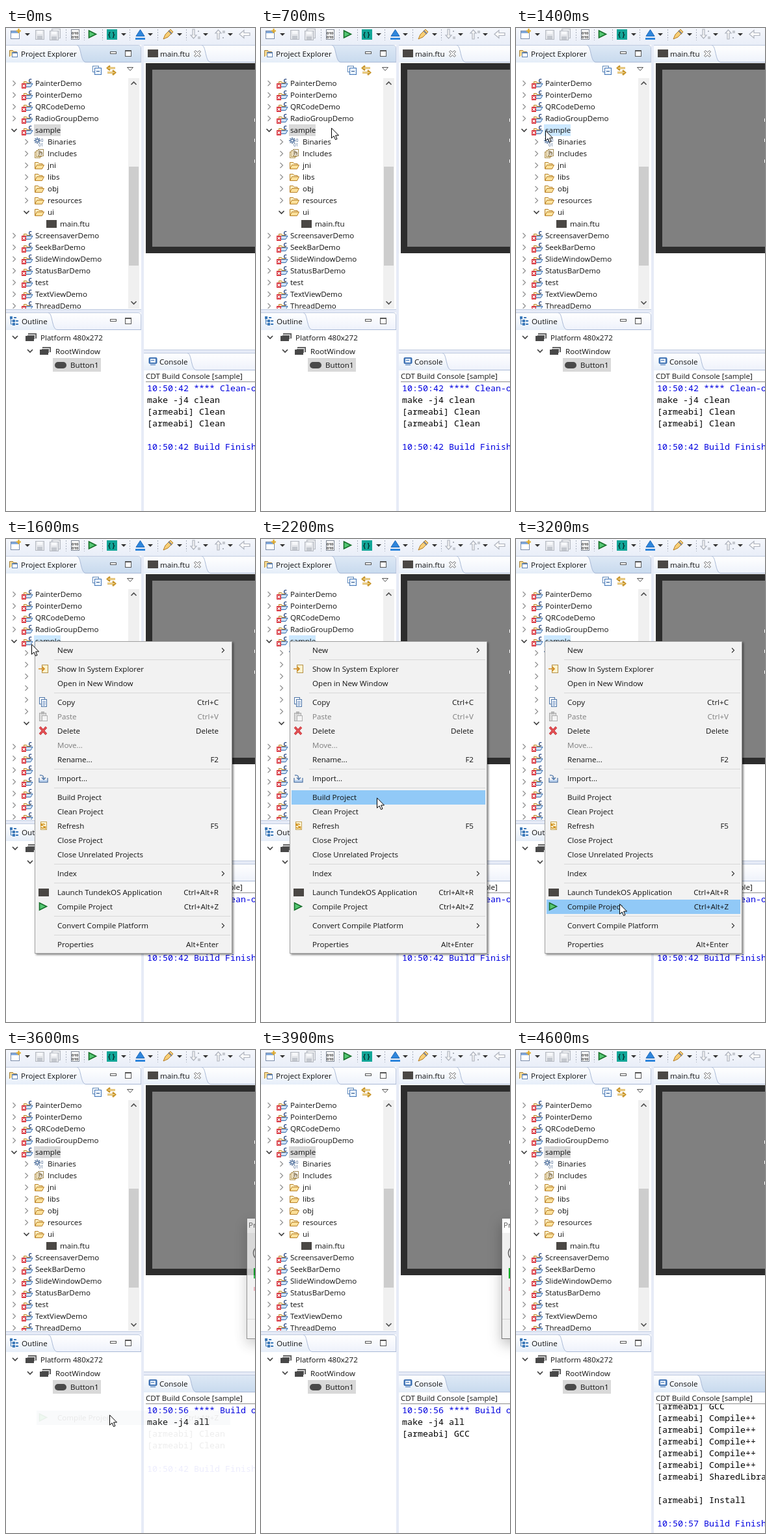
Animation of 383x742 px, one loop 5.9 s. Source, as an HTML page:

```html
<!DOCTYPE html>
<html lang="en">
<head>
<meta charset="utf-8">
<title>Building a project</title>
<style>
html, body { margin: 0; width: 100%; height: 100%; overflow: hidden; background: #fff; }
svg { display: block; width: 383px; height: 742px; }
text { font: 11.6px "Open Sans", "Noto Sans", sans-serif; white-space: pre; }
.mono { font: 13.33px "Noto Sans Mono", "DejaVu Sans Mono", monospace; }
rect { shape-rendering: crispEdges; }
.soft { shape-rendering: auto; }
</style>
</head>
<body>
<svg id="stage" viewBox="0 0 383 742"></svg>
<script>
const LOOP = 5900, STEP = 100;
const INK = '#111', BLUE = '#0000e0';

const rect = (x, y, w, h, fill, more = '') =>
  `<rect x="${x}" y="${y}" width="${w}" height="${h}" fill="${fill}" ${more}/>`;
const box = (x, y, w, h, fill, stroke, more = '') =>
  rect(x + .5, y + .5, w - 1, h - 1, fill, `stroke="${stroke}" ${more}`);
const path = (d, stroke, width = 1, fill = 'none') =>
  `<path d="${d}" stroke="${stroke}" stroke-width="${width}" fill="${fill}"/>`;
const text = (x, y, s, fill = INK, more = '') =>
  `<text x="${x}" y="${y}" fill="${fill}" ${more}>${s}</text>`;
const at = (x, y, s) => `<g transform="translate(${x} ${y})">${s}</g>`;
const group = (id, s) => `<g id="${id}">${s}</g>`;

// Small icons, each drawn from its top left corner
const icon = {
  folder: path('M1.5 13V3.5h5l1.5 2h5V8', '#b98127', 1, '#fdeec0') +
    path('M1.5 13.5l3-6h11l-3 6z', '#b98127', 1, '#fbe09a'),
  project: path('M3.5 12V5.5h4l1 2h5V9', '#b98127', 1, '#fdeec0') +
    path('M4 13.5l3-5h10l-3 5z', '#3569a8', 1, '#cfe2f8') +
    text(10.5, 6.5, 'C', '#20407c', 'style="font-size:8.5px;font-weight:700"') +
    rect(0, 8, 7, 8, '#d8323c') + path('M1.5 10l4 4m0-4l-4 4', '#fff', 1.3),
  binaries: path('M5 1v10M0 6h10M1.5 2.5l7 7m0-7l-7 7', '#4d6f9c', 1.4) +
    '<circle cx="5" cy="6" r="2" fill="#fff" stroke="#4d6f9c"/>' +
    text(7, 8, '10', '#3c5c86', 'style="font-size:6.5px"') + text(7, 15, '01', '#3c5c86', 'style="font-size:6.5px"'),
  includes: box(1, 5, 9, 10, '#fff6dc', '#b09355') + box(3, 3, 9, 10, '#fff6dc', '#b09355') +
    box(6, 1, 9, 11, '#fff', '#a38a52') + text(7.5, 10, 'h', '#6c5426', 'style="font-size:9px;font-weight:700"'),
  app: rect(0, 2, 16, 12, '#4a4744'),
  tree: [1, 6, 11].map((y, i) => rect(i ? 5 : 1, y, 4, 4, '#3b78b8') + rect(i ? 10 : 7, y + 1, 4, 2, '#3b78b8')).join('') +
    path('M2.5 5v8h3M2.5 8h3', '#3b78b8'),
  windows: box(4, 0, 13, 8, '#777', '#555') + box(2, 2, 13, 8, '#666', '#fff') + rect(0, 4, 13, 8, '#484848'),
  screen: '<rect class="soft" x=".5" y="1" width="13" height="10" rx="2" fill="#3f72b4"/>' +
    rect(3, 3, 8, 6, '#eaf3fd') + rect(4, 5, 5, 1, '#3f72b4') + rect(3, 12, 8, 1, '#3f72b4'),
  explorer: path('M1.5 13V3.5h5l1 2h5V7', '#a5813c', 1, '#f8dc92') + box(5, 6, 9, 8, '#fff', '#5d82b3') +
    rect(5, 6, 9, 2, '#5d82b3'),
  reveal: box(5, 1, 10, 13, '#fff4cf', '#b59146') + path('M0 7.5h8M5.5 4l3.5 3.5-3.5 3.5', '#d18a1f', 1.7),
  copy: box(1, 0, 9, 11, '#fff', '#4f76a8') + box(4, 3, 9, 12, '#f2f7ff', '#4f76a8') +
    path('M6 6.5h5M6 8.5h5M6 10.5h5M6 12.5h4', '#7d9cc4'),
  paste: box(1, 2, 11, 13, '#dcdcdc', '#aaa') + rect(4, 0, 5, 4, '#b4b4b4') + box(5, 6, 9, 9, '#f4f4f4', '#b0b0b0'),
  cross: path('M2 2l10 11M12 2L2 13', '#c62f36', 3.4) + path('M2 2l10 11M12 2L2 13', '#ea5a5c', 1.6),
  load: path('M1 7v6.5h13V7', '#4f76a8', 1.3) + rect(2, 10, 11, 3, '#bfd4ee') +
    path('M2 3c5-1 6 2 6 6M5 6.5l3 3 3-3', '#4f76a8', 1.3),
  refresh: box(3, 1, 10, 13, '#fff6d8', '#c6a456') +
    path('M10 6a3.5 3.5 0 0 0-6 1M4 3.5V7h3.5M4 10a3.5 3.5 0 0 0 6-1M10.5 12.5V9H7', '#d0901b', 1.5),
  play: path('M1.5 2l11 5.5-11 5.500z', '#176f2b', 1.6, '#55c773'),
  link: path('M14 4.5H3M6 1L2 4.5 6 8M2 11.5h11M10 8l4 3.5-4 3.5', '#c9962c', 2.6) +
    path('M14 4.5H3M2 11.5h11', '#fbe6a4', 1),
  collapse: box(0, 0, 10, 10, '#fff', '#5b86b8') + box(3, 3, 11, 11, '#eaf3fd', '#3f72b4') + rect(6, 8, 5, 1, '#234f8a')
};

const chevron = (x, y) => path(`M${x} ${y - 4}l4 4-4 4`, '#8f8f8f', 1.2);
const opened = (x, y) => path(`M${x} ${y - 2}l4 4 4-4`, '#404040', 1.7);
const drop = x => `<path d="M${x} 8h8l-4 4z" fill="#333"/>`;
const grip = x => `<path d="M${x + .5} 2v17" stroke="#a8afbd" stroke-dasharray="2 2"/>`;

function toolbar() {
  const disk = box(0, 0, 14, 15, '#e4e6ea', '#b5b9c1') + rect(3, 1, 8, 5, '#f6f7f9') + rect(3, 9, 8, 5, '#c3c7ce');
  const faint = d => path(d, '#aeb3bd', 1.2, '#fafafa');
  const bits = y => text(2, y, '010', '#333', 'style="font-size:6px;font-weight:700"');
  return rect(0, 0, 383, 26, 'url(#bar)') +
    at(7, 3, box(0, 1, 14, 13, '#fff', '#7a8caa') + rect(1, 2, 12, 3, '#7fa8dc') + path('M12.5-2v7M9 1.5h7', '#e0a928', 2.2)) +
    drop(29) + at(45, 3, disk) + at(70, 1, disk) + at(67, 4, disk) + grip(92) +
    at(99, 2, box(1, 0, 13, 16, '#fff', '#7d8592') + bits(8) + bits(14)) +
    grip(120) + at(126, 2, icon.play) + grip(148) +
    rect(155, 2, 16, 16, '#12a698') + text(157, 14, '{ }', '#062c2a', 'style="font-size:10px;font-weight:700"') +
    drop(177) + grip(190) + path('M200 12.5l6.5-10 6.500 10z', '#1d68b8', 1, '#2f86dc') + rect(199, 15, 15, 3, '#2f86dc') +
    drop(218) + grip(233) +
    path('M242 17l3-7 8-8 4 4-8 8z', '#b67d24', 1, '#f7ce76') + path('M250 4l5 5', '#7a7f8e', 2) + drop(263) + grip(277) +
    faint('M287 2h3v9h3l-4.500 5-4.500-5h3z') + rect(295, 4, 2, 2, '#aeb3bd') + rect(295, 13, 4, 4, '#c5c9d0') + drop(303) +
    faint('M325 17h3V8h3l-4.500-5-4.500 5h3z') + rect(333, 4, 4, 4, '#c5c9d0') + rect(333, 14, 2, 2, '#aeb3bd') + drop(341) +
    faint('M359 9.5l7-6v4h9v4h-9v4z');
}

// A view with one tab, whose right edge is an S curve; the focused look lies on top
function view(id, x, y, w, h, edge, label, labelX, pic) {
  const r = x + w;
  const header = (head, tab) =>
    `<path d="M${x} ${y + 27}V${y + 4}q0-3 3-3H${r - 5}q4 0 4 4v22z" fill="url(#${head})"/>` +
    `<path d="M${x} ${y + 27}V${y + 1}H${edge - 9}c7 0 5 26 14 26z" fill="url(#${tab})"/>`;
  return rect(x, y, w, h, '#fff') + header('head', 'tab') + group(id, header('headOn', 'tabOn')) +
    path(`M${x} ${y + .5}H${r - 5}q4.5 0 4.5 4.5V${y + 26}`, '#c0cbe0') +
    path(`M${edge - 9} ${y + .5}c7 0 5 26 14 26H${r}`, '#a9b9d6') +
    at(labelX - 19, y + 5, pic) + text(labelX, y + 18, label);
}
const sizers = y => box(160, y + 2, 10, 4, '#fff', '#555') + box(183, y, 10, 10, '#fff', '#555') + rect(183, y, 10, 2, '#555');

const tree = [
  ['PainterDemo'], ['PointerDemo'], ['QRCodeDemo'], ['RadioGroupDemo'], ['sample', 0, '', 1],
  ['Binaries', 1, 'binaries'], ['Includes', 1, 'includes'], ['jni', 1], ['libs', 1], ['obj', 1], ['resources', 1],
  ['ui', 1, '', 1], ['main.ftu', 2, 'app'],
  ['ScreensaverDemo'], ['SeekBarDemo'], ['SlideWindowDemo'], ['StatusBarDemo'], ['test'], ['TextViewDemo'], ['ThreadDemo']
];

function explorer() {
  const rows = tree.map(([name, level = 0, pic, open], i) => {
    const y = 85 + 18 * i, x = 19 * level;
    const mark = level > 1 ? '' : open ? opened(x + 8.5, y) : chevron(x + 10.5, y);
    return mark + at(24 + x, y - 8, icon[pic || (level ? 'folder' : 'project')]) + text(45 + x, y + 4, name);
  }).join('');
  return view('treeFocus', 0, 26, 208, 407, 118, 'Project Explorer', 23, icon.explorer) + sizers(34) +
    at(133, 58, icon.collapse) + at(154, 57, icon.link) + path('M186.5 60.5h9l-4.5 5z', '#555', 1, '#fff') +
    rect(188, 77, 17, 354, '#f0f0f0') + rect(189, 213, 15, 152, '#cdcdcd') +
    path('M192.5 87l4-4 4 4M192.5 420l4 4 4-4', '#505050', 1.7) +
    '<g clip-path="url(#treeClip)">' + rect(43, 148, 41, 18, '#d9d9d9', 'id="sel"') + rows + '</g>' +
    rect(0, 432, 208, 1, '#c0cbe0');
}

function outline() {
  return view('outlineFocus', 0, 437, 208, 305, 74, 'Outline', 24, icon.tree) + sizers(445) +
    opened(10, 475) + at(30, 469, icon.windows) + text(53, 480, 'Platform 480x272') +
    opened(33, 496) + at(52, 490, icon.windows) + text(76, 501, 'RootWindow') +
    rect(72, 507, 74, 21, '#d9d9d9') +
    '<rect class="soft" x="75" y="513" width="18" height="10" rx="5" fill="#4a4a4a"/>' + text(99, 522, 'Button1');
}

function editor() {
  return view('editorFocus', 212, 26, 180, 469, 310, 'main.ftu', 237, icon.app) +
    path('M289.5 36.5l2-2 3 3 3-3 2 2-3 3 3 3-2 2-3-3-3 3-2-2 3-3z', '#666', 1, '#fff') +
    rect(215, 54, 168, 292, '#2d2d2d') + rect(225, 64, 158, 272, '#808080') +
    [139, 170, 202].map(y => rect(382, y, 1, 5, '#fff')).join('') + rect(212, 494, 171, 1, '#c0cbe0');
}

const lines = (list, base) => list.map(([i, s]) =>
  text(217, base + 18 * i, s, /^\d/.test(s) ? BLUE : '#000', 'class="mono"')).join('');
const cleaned = [[0, '10:50:42 **** Clean-only build of'], [1, 'make -j4 clean'],
  [2, '[armeabi] Clean'], [3, '[armeabi] Clean'], [5, '10:50:42 Build Finished']];
const compiled = ['GCC', ...Array(5).fill('Compile++'), 'SharedLibrary'].map((s, i) => [i, '[armeabi] ' + s]);

function consoleView() {
  return view('logFocus', 212, 499, 180, 243, 288, 'Console', 236, at(2, 1, icon.screen)) +
    text(215, 539, 'CDT Build Console [sample]') + rect(215, 543, 168, 1, '#8c8c8c') +
    '<g clip-path="url(#logClip)">' +
    group('old', lines(cleaned, 558)) + group('oldFade', lines(cleaned.slice(2), 558)) +
    group('start', lines([[0, '10:50:56 **** Build of config'], [1, 'make -j4 all']], 558)) +
    group('early', lines([[2, '[armeabi] GCC']], 558)) +
    group('done', lines(compiled, 552)) +
    group('end', lines([[8, '[armeabi] Install'], [10, '10:50:57 Build Finished']], 552)) + '</g>';
}

function dialog() {
  return box(370, 258, 60, 186, '#f0f0f0', '#777', 'style="filter:drop-shadow(0 8px 10px rgba(0,0,0,.25))"') +
    rect(371, 259, 20, 22, '#fff') + text(373, 273, 'Progress', '#555') +
    '<circle cx="391" cy="312" r="10.5" fill="#f7f7f7" stroke="#666" stroke-width="1.5"/>' +
    rect(381, 335, 4, 16, '#06b025') + rect(381, 364, 2, 6, '#e9a0ac') + rect(371, 413, 12, 1, '#d4d4d4');
}

const menu = [
  [171, 'New', '>'], [200, 'Show In System Explorer', '', 'reveal'], [222, 'Open in New Window'],
  [251, 'Copy', 'Ctrl+C', 'copy'], [273, 'Paste', 'Ctrl+V', 'paste', 1], [295, 'Delete', 'Delete', 'cross'],
  [317, 'Move...', '', '', 1], [339, 'Rename...', 'F2'], [368, 'Import...', '', 'load'],
  [397, 'Build Project'], [419, 'Clean Project'], [441, 'Refresh', 'F5', 'refresh'],
  [463, 'Close Project'], [485, 'Close Unrelated Projects'], [514, 'Index', '>'],
  [543, 'Launch TundekOS Application', 'Ctrl+Alt+R', 'app'], [565, 'Compile Project', 'Ctrl+Alt+Z', 'play'],
  [594, 'Convert Compile Platform', '>'], [623, 'Properties', 'Alt+Enter']
];
const menuRow = ([y, name, key = '', pic, off]) => {
  const ink = off ? '#7d7d7d' : INK;
  return text(79, y + 4, name, ink) + (pic ? at(50, y - 8, icon[pic]) : '') +
    (key === '>' ? path(`M332 ${y - 3.5}l3.5 3.5-3.5 3.5`, '#333', 1.1)
      : text(327, y + 4, key, ink, 'text-anchor="end"'));
};

function popup() {
  return box(44, 157, 304, 480, '#f2f2f2', '#a0a0a0', 'style="filter:drop-shadow(2px 2px 1.5px rgba(0,0,0,.45))"') +
    rect(47, 0, 298, 22, '#91c9f7', 'id="hot"') +
    [185, 236, 353, 382, 499, 528, 579, 608].map(y => rect(74, y, 271, 1, '#d7d7d7')).join('') +
    menu.map(menuRow).join('');
}

const shade = (id, a, b) =>
  `<linearGradient id="${id}" x2="0" y2="1"><stop stop-color="${a}"/><stop offset="1" stop-color="${b}"/></linearGradient>`;
const clip = (id, ...r) => `<clipPath id="${id}">${rect(...r, '#000')}</clipPath>`;

const el = id => document.getElementById(id);
const show = (id, on) => el(id).style.display = on ? '' : 'none';

el('stage').innerHTML = '<defs>' + shade('bar', '#f5f7fc', '#e9eef8') +
  shade('head', '#ffffff', '#eef2fb') + shade('tab', '#ffffff', '#e6eef9') +
  shade('headOn', '#dde8f5', '#c8daee') + shade('tabOn', '#ffffff', '#e4edf8') +
  clip('treeClip', 0, 77, 188, 354) + clip('logClip', 214, 544, 169, 198) + '</defs>' +
  rect(0, 0, 383, 742, '#e6ebf7') + toolbar() + explorer() + outline() + editor() + consoleView() +
  group('dlg', dialog()) + group('pop', popup()) +
  group('ghost', rect(47, 554, 298, 22, '#c4d2de') + menuRow(menu[16])) +
  group('cur', path('M.5 .8v15.4l3.6-3.3 2.4 5.6 2.5-1-2.4-5.500h4.900z', '#000', 1, '#fff'));
show('outlineFocus', false);
show('editorFocus', false);

// Pointer path: time, x, y
const trail = [
  [100, 232, 117], [200, 232, 117], [300, 213, 119], [500, 152, 128], [700, 108, 153], [800, 90, 159],
  [900, 82, 157], [1200, 55, 157], [1400, 45, 157], [1500, 39, 161], [1600, 39, 161], [1800, 98, 200],
  [2000, 160, 248], [2200, 178, 397], [2400, 178, 470], [2600, 170, 518], [2700, 167, 529],
  [3000, 160, 556], [3100, 159, 560], [3700, 159, 560]
];
function pointer(t) {
  const i = trail.findIndex(k => k[0] >= t);
  if (i < 1) return trail[i < 0 ? trail.length - 1 : 0].slice(1);
  const [a, b] = [trail[i - 1], trail[i]], p = (t - a[0]) / (b[0] - a[0]);
  return [1, 2].map(n => Math.round(a[n] + (b[n] - a[n]) * p));
}

const ghostLevels = [.6, .3, .15, .09, .05, .03];
const dialogLevels = [.4, .8];

function draw(ms) {
  const t = Math.floor(ms % LOOP / STEP) * STEP;
  const between = (a, b) => t >= a && t < b;
  const [x, y] = pointer(t);
  el('cur').setAttribute('transform', `translate(${x} ${y})`);
  show('cur', between(100, 3800));
  el('sel').setAttribute('fill', between(900, 3300) ? '#cce8ff' : '#d9d9d9');

  show('pop', between(1500, 3300));
  const hit = x > 46 && menu.find(m => y >= m[0] - 11 && y < m[0] + 11);
  show('hot', hit);
  if (hit) el('hot').setAttribute('y', hit[0] - 11);
  el('ghost').style.opacity = ghostLevels[(t - 3300) / STEP] || 0;

  show('treeFocus', t < 3500);
  show('logFocus', t >= 3500);
  show('old', t < 3500);
  el('oldFade').style.opacity = between(3500, 3800) ? .07 : 0;
  show('start', between(3500, 4500));
  show('early', between(3900, 4500));
  show('done', t >= 4500);
  show('end', t >= 4600);
  show('dlg', between(3500, 4500));
  el('dlg').style.opacity = dialogLevels[(t - 3500) / STEP] || 1;
}

const began = performance.now();
function tick() {
  draw(performance.now() - began);
  requestAnimationFrame(tick);
}
tick();
</script>
</body>
</html>
```
